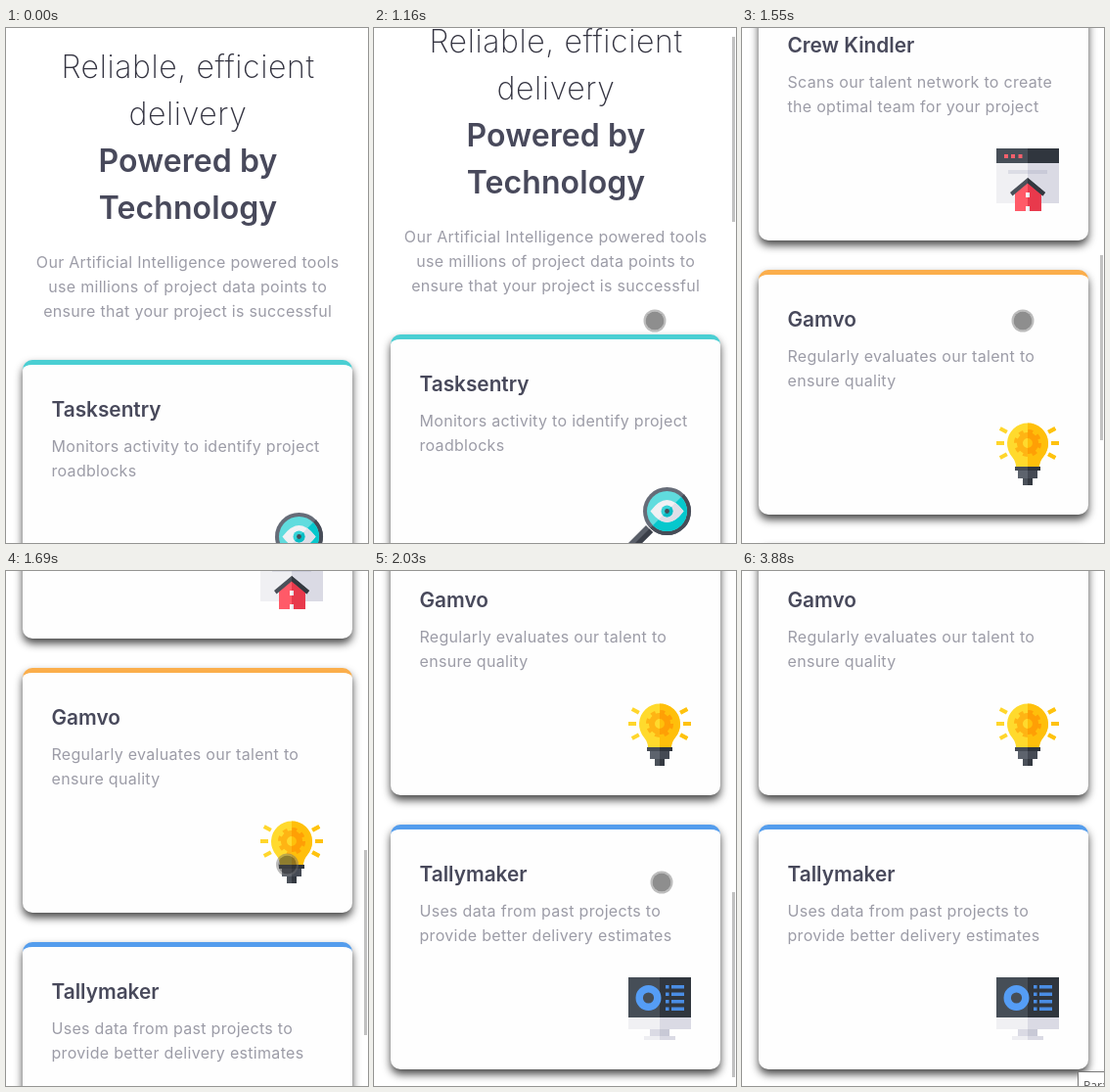
Recreate the animation shown at these times as an HTML page. Size 370 by 526 pixels, loop 3950 ms.

```html
<!DOCTYPE html>
<html lang="en">
<head>
<meta charset="utf-8">
<title>Delivery tools</title>
<style>
  html, body { margin: 0; width: 100%; height: 100%; overflow: hidden; background: #fff; }
  #stage { position: relative; width: 370px; height: 526px; overflow: hidden; background: #fff; }
  #page { position: absolute; left: 0; top: 0; width: 370px; height: 1446px; }
  svg { position: absolute; left: 0; top: 0; overflow: visible; }
  text { font-family: Inter, "Open Sans", sans-serif; font-optical-sizing: none; }
  .thin { font-size: 32px; font-weight: 200; letter-spacing: .6px; fill: #333340; text-anchor: middle; }
  .bold { font-size: 32px; font-weight: 600; letter-spacing: .1px; fill: #48495b; text-anchor: middle; }
  .body { font-size: 16px; letter-spacing: .3px; fill: #9c9ca7; }
  .mid { text-anchor: middle; }
  .name { font-size: 20.8px; font-weight: 600; fill: #48495b; }
  .card {
    position: absolute; left: 17px; width: 337px; height: 250px; box-sizing: border-box;
    border-top: 5px solid; border-radius: 10px; background: #fefefe;
    box-shadow: 0 5px 8px rgba(0, 0, 0, .72);
  }
  .card svg { top: -5px; }
  #bar { position: absolute; left: 366px; top: 0; width: 3px; height: 189px; background: #c1c1c1; }
  #dot {
    position: absolute; left: -11.5px; top: -11.5px; width: 23px; height: 23px;
    box-sizing: border-box; border-radius: 50%; border: 2px solid rgba(110, 110, 110, .45);
    background: rgba(50, 50, 50, .55); background-clip: padding-box;
  }
  #tip {
    position: absolute; left: 343px; top: 511px; width: 60px; height: 24px; box-sizing: border-box;
    border: 1px solid #777; background: #fff; color: #555; padding-left: 5px;
    font: 12px/27px "Open Sans", sans-serif;
  }
</style>
</head>
<body>
<div id="stage">
  <div id="page">
    <svg width="370" height="330">
      <defs>
        <clipPath id="right"><path d="M32 0H64V64H32Z"/></clipPath>
        <clipPath id="lower"><path d="M64 0V64H0Z"/></clipPath>
      </defs>
      <text class="thin" x="186" y="51">Reliable, efficient</text>
      <text class="thin" x="186" y="99">delivery</text>
      <text class="bold" x="186" y="147">Powered by</text>
      <text class="bold" x="186" y="195">Technology</text>
      <text class="body mid" x="185.7" y="245">Our Artificial Intelligence powered tools</text>
      <text class="body mid" x="185.7" y="270">use millions of project data points to</text>
      <text class="body mid" x="185.7" y="295">ensure that your project is successful</text>
    </svg>
  </div>
  <div id="bar"></div>
  <div id="dot"></div>
  <div id="tip">Para</div>
</div>
<script>
const $ = id => document.getElementById(id);

// Draws a shape in one tone, then its shaded side in another.
const two = (shape, a, b, clip = 'right') =>
  `<g fill="${a}" color="${a}">${shape}</g>` +
  `<g fill="${b}" color="${b}" clip-path="url(#${clip})">${shape}</g>`;
const path = d => `<path d="${d}"/>`;
const circle = (x, y, r) => `<circle cx="${x}" cy="${y}" r="${r}"/>`;
const rect = (x, y, w, h) => path(`M${x} ${y}h${w}v${h}h${-w}z`);

const lens =
  two(path('M0 57 18 39 25 46 7 64Z'), '#5a5f69', '#3b3f49', 'lower') +
  two(circle(39.5, 24.5, 24.5), '#666c78', '#464c57', 'lower') +
  two(circle(39.5, 24.5, 20.5), '#60dcde', '#06c8cd', 'lower') +
  two(path('M22.5 24.5Q31 13 39.5 13T56.5 24.5Q48 36 39.5 36T22.5 24.5Z'), '#f1f1f4', '#dedfe8', 'lower') +
  two(circle(39.5, 24.5, 6), '#35d2d6', '#06bcc4', 'lower') +
  `<g fill="#464c57">${circle(39.5, 24.5, 2.4)}</g>`;

const house =
  two(rect(0, 15, 64, 41), '#f0f0f3', '#dadae4') +
  two(rect(0, 0, 64, 15), '#464e57', '#30363e') +
  `<g fill="#f5606c">${[8, 15, 22.5].map(x => rect(x, 6, 4, 4)).join('')}</g>` +
  two(rect(12, 22, 40, 4), '#dcdde5', '#c9cad8') +
  two(path('M19 64V45L32 33 46 45V64Z'), '#ff5a68', '#e8394c') +
  two(path('M32 30 50 45 47.5 48.5 32 35.5 16.5 48.5 14 45Z'), '#4a5059', '#33383f') +
  two(rect(30, 45, 4, 5) + rect(30, 59, 4, 5), '#fff', '#e6e6ee');

const rays = [-28, 0, 28].map(a => [0, 180].map(b =>
  `<rect x="24" y="-2" width="8" height="4" transform="translate(32 21) rotate(${a + b})"/>`).join('')).join('');
const gear = '<circle cx="32" cy="21" r="8" fill="none" stroke="currentColor" stroke-width="6"/>' +
  '<circle cx="32" cy="21" r="12" fill="none" stroke="currentColor" stroke-width="4" stroke-dasharray="4.712"/>';
const bulb =
  two(rays, '#ffd62c', '#ffc20f') +
  two(path('M20 45Q20 40 16 35A21 21 0 1 1 48 35Q44 40 44 45Z'), '#ffda2d', '#ffbf0b') +
  two(gear, '#ffb414', '#ff9f05') +
  two(rect(19, 45, 26, 4), '#464c55', '#30353d') +
  two(rect(22, 49, 20, 8), '#5d636d', '#454a54') +
  two(rect(27, 57, 10, 7), '#4a5059', '#343941');

const rows = [8, 15.5, 23, 30.5].map(y => rect(38, y, 3.5, 3.5) + rect(44, y, 13, 3.5)).join('');
const screen =
  two(rect(16, 60, 32, 4), '#eeeef2', '#dadae4') +
  two(rect(22, 53, 20, 7), '#dadae4', '#c8c9d6') +
  two(rect(0, 41, 64, 12), '#f0f0f3', '#dadae4') +
  two(rect(0, 0, 64, 41), '#464e57', '#30363e') +
  '<circle cx="20.5" cy="21" r="9.3" fill="none" stroke="#559df5" stroke-width="7.4"/>' +
  `<g fill="#4a8de4">${rows}</g>`;

const cards = [
  ['#4acfd3', 'Tasksentry', 'Monitors activity to identify project', 'roadblocks', lens],
  ['#e2555b', 'Crew Kindler', 'Scans our talent network to create', 'the optimal team for your project', house],
  ['#fbae4b', 'Gamvo', 'Regularly evaluates our talent to', 'ensure quality', bulb],
  ['#549ded', 'Tallymaker', 'Uses data from past projects to', 'provide better delivery estimates', screen]
];
cards.forEach(([color, name, line1, line2, icon], i) => {
  $('page').insertAdjacentHTML('beforeend',
    `<div class="card" style="top:${339 + 280 * i}px;border-color:${color}">
      <svg width="337" height="250">
        <text class="name" x="29.5" y="58">${name}</text>
        <text class="body" x="29.5" y="94">${line1}</text>
        <text class="body" x="29.5" y="119">${line2}</text>
        <g transform="translate(243 156)">${icon}</g>
      </svg>
    </div>`);
});

const LOOP = 3950;
const run = (from, step, n) => Array.from({ length: n }, (_, i) => from + step * i);
const ticks = [0, ...run(190, 80, 7), 740, 1160, 1230, 1290, 1350, ...run(1410, 70, 5),
  ...run(1820, 70, 5), ...run(2370, 70, 6), 3750, 3815, 3880];

const scrollKeys = [[1125, 0], [1350, 400], [1690, 800], [1770, 800], [2030, 920]];
const dotKeys = [[190, 349, 500], [430, 301, 368], [590, 280, 312], [670, 284, 301],
  [740, 286.5, 298.5], [1620, 286.5, 298.5], [1690, 287, 299.5], [2030, 293.5, 317.5],
  [2320, 293.5, 317.5], [2650, 350, 520], [2720, 352, 545]];

const smooth = p => p * p * (3 - 2 * p);
function at(keys, t, ease = p => p) {
  if (t <= keys[0][0]) return keys[0].slice(1);
  const i = keys.findIndex(k => k[0] > t);
  if (i < 0) return keys[keys.length - 1].slice(1);
  const a = keys[i - 1], b = keys[i];
  const p = ease((t - a[0]) / (b[0] - a[0]));
  return a.slice(1).map((v, n) => v + (b[n + 1] - v) * p);
}

function draw(now) {
  const time = now % LOOP;
  const t = ticks.filter(k => k <= time).pop();
  const y = Math.round(at(scrollKeys, t, smooth)[0]);
  const [dx, dy] = at(dotKeys, t);
  $('page').style.top = -y + 'px';
  $('bar').style.top = Math.floor(y * .357) + 'px';
  $('bar').style.visibility = t >= 1160 && t < 2100 ? 'visible' : 'hidden';
  $('dot').style.transform = `translate(${dx}px, ${dy}px)`;
  $('dot').style.visibility = t >= 190 && t < 2720 ? 'visible' : 'hidden';
  $('tip').style.opacity = t < 3750 ? 0 : (t - 3685) / 195;
}

const start = performance.now();
function frame() {
  draw(performance.now() - start);
  requestAnimationFrame(frame);
}
frame();
</script>
</body>
</html>
```
